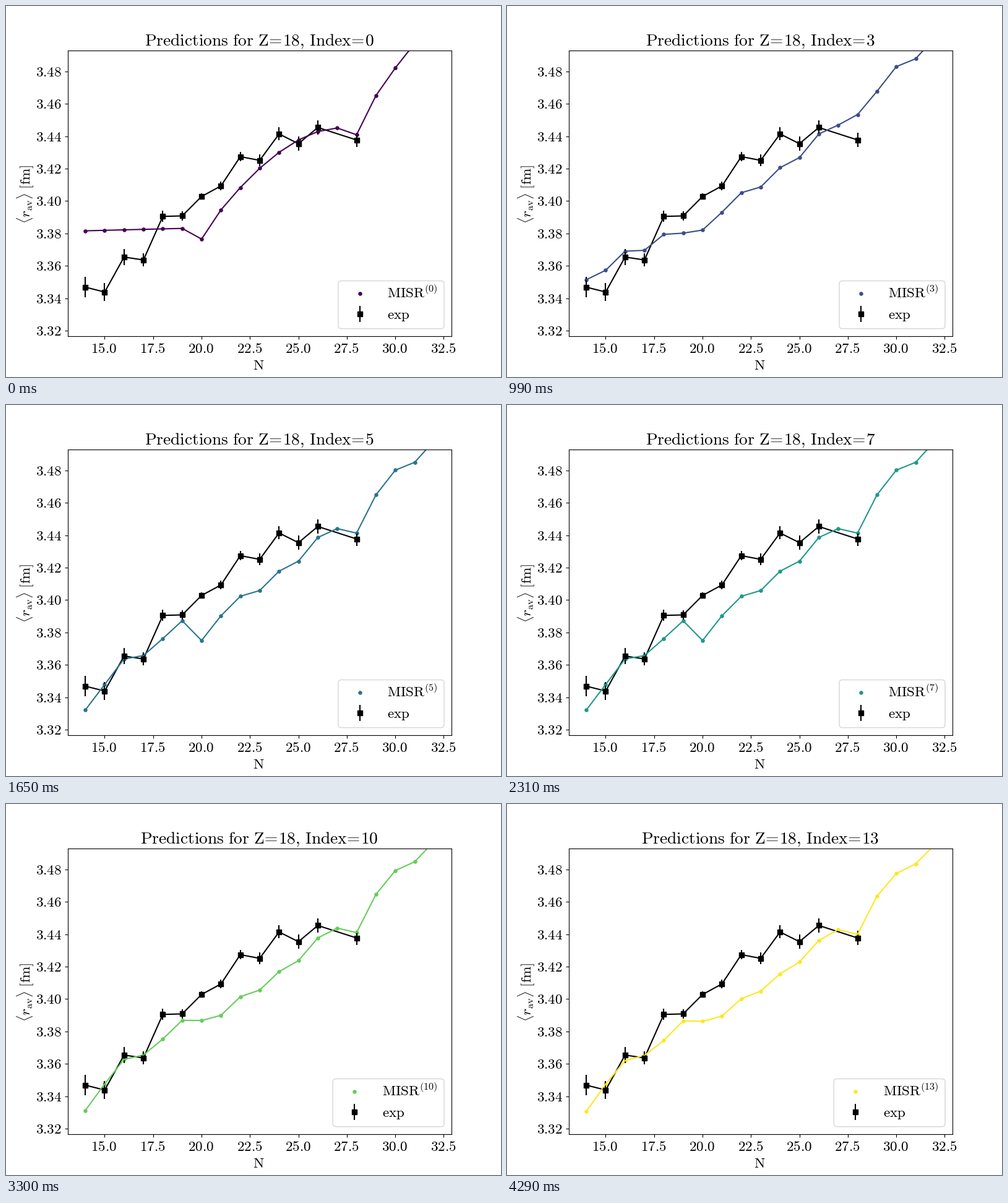
Animation of 800x600 px, one loop 4620 ms. Source, as a matplotlib script:

```python
import matplotlib.pyplot as plt
import numpy as np
from matplotlib.animation import FuncAnimation
from matplotlib.patches import FancyBboxPatch

plt.rcParams["mathtext.fontset"] = "cm"

STEPS = 14
TEXT, TITLE = 16.6, 19.75
X_MIN, X_MAX = 13.1, 32.9
Y_MIN, Y_MAX = 3.31653, 3.49293

# Offsets are in units of 1e-4 fm above 3.3 fm.
EXP_N = np.append(np.arange(14, 27), 28)
EXP = [468, 438, 654, 636, 905, 908, 1028, 1093, 1274, 1251, 1414, 1354, 1454, 1377]
EXP_ERR = 20 + np.maximum(7 * (20 - EXP_N), np.minimum(5 * (EXP_N - 20), 24))

N = np.arange(14, 33)
ODD = N % 2 == 1
MAGIC = np.isin(N, (20, 28))
EVEN_KNOTS = [338, 653, 779, 809, 1040, 1195, 1403, 1523, 1819, 2000]


def radius(offset):
    return 3.3 + np.asarray(offset) * 1e-4


def ramp(index, start, end):
    return np.clip((index - start) / (end - start), 0, 1)


# Odd isotopes sag below their even neighbours, most of all beside multiples of 8.
sag = np.where(np.isin(N % 8, (1, 7)), 42, 5) * (ODD & (N > 16))
smooth = np.interp(N, N[::2], EVEN_KNOTS) - sag

# First guess: a plateau, a dip at 20, an arc up to 27, then a rise from 28.
first = np.select(
    [N < 20, N == 20, N < 28],
    [816 + 3 * (N - 14), 765, 1451 - 22 * np.abs(27 - N) ** 1.75],
    1409 + 242 * np.abs(N - 28) ** 0.77)

light_excess = 22 + 330 * np.exp(-0.92 * (N - 14))
shell = -17 + 100 * (N == 19) - 42 * (N == 20) - 93 * (N == 28)
filled_dip = 120 * (N == 20)
pairing = -6 - 12 * (~ODD & ~MAGIC)
tilt = 3 - 0.75 * (N - 14)


def prediction(index):
    """Each correction joins the model over its own span of steps."""
    refined = (smooth
               + light_excess * (1 - ramp(index, 2, 4))
               + shell * ramp(index, 4, 5)
               + filled_dip * ramp(index, 7, 8)
               + pairing * ramp(index, 9, 11)
               + tilt * ramp(index, 11, 13))
    blend = ramp(index, 0, 2)
    return radius(first * (1 - blend) + refined * blend)


fig = plt.figure(figsize=(8, 6), dpi=100, facecolor="white")
ax = fig.add_axes([0.125, 0.11, 0.775, 0.77])
ax.set(xlim=(X_MIN, X_MAX), ylim=(Y_MIN, Y_MAX))
x_ticks = np.arange(15, 33, 2.5)
y_ticks = np.arange(3.32, 3.49, 0.02)
ax.set_xticks(x_ticks, labels=[])
ax.set_yticks(y_ticks, labels=[])

# Overlay in stage pixels, y pointing down, for all text and the legend.
stage = fig.add_axes([0, 0, 1, 1])
stage.set(xlim=(0, 800), ylim=(600, 0))
stage.axis("off")


def roman(text):
    return rf"$\mathrm{{{text}}}$"


def label(x, y, text, size=TEXT, ha="center", **kw):
    return stage.text(x, y, text, fontsize=size, ha=ha, va="baseline", **kw)


for tick in x_ticks:
    x = 100 + 620 * (tick - X_MIN) / (X_MAX - X_MIN)
    label(x - 1, 561, roman(f"{tick:.1f}"))
for tick in y_ticks:
    y = 534 - 462 * (tick - Y_MIN) / (Y_MAX - Y_MIN)
    label(90.3, y + 8, roman(f"{tick:.2f}"), ha="right")
label(408.5, 588, roman("N"))
label(39.5, 304, r"$\langle r_{\mathrm{av}}\rangle\ \mathrm{[fm]}$",
      rotation=90, rotation_mode="anchor")
title = label(409.5, 63.5, "", TITLE)

# Measured values
ax.plot(EXP_N, radius(EXP), color="black", lw=1.5)
ax.errorbar(EXP_N, radius(EXP), yerr=EXP_ERR * 1e-4, fmt="s",
            color="black", ms=6, elinewidth=1.5)

# Predicted values
dots = ax.scatter(N, prediction(0), s=10, lw=1.5, zorder=1)
line, = ax.plot(N, prediction(0), lw=1.5)

# Legend
box = FancyBboxPatch((537, 444.5), 171, 77.3, boxstyle="round,pad=0,rounding_size=5",
                     fc="white", ec="0.8", lw=1, alpha=0.8)
stage.add_patch(box)
key_dot = stage.scatter([572], [465], s=10, lw=1.5)
key_bar, = stage.plot([572, 572], [485, 511], color="black", lw=1.5,
                      solid_capstyle="butt")
key_square, = stage.plot([572], [498], "s", color="black", ms=6)
key_name = label(616.5, 472, "", ha="left")
key_exp = label(616.5, 506.5, roman("exp"), ha="left")


def draw(index):
    color = plt.cm.viridis(index / (STEPS - 1))
    values = prediction(index)
    line.set_data(N, values)
    line.set_color(color)
    dots.set_offsets(np.column_stack([N, values]))
    dots.set_color(color)

    title.set_text(roman(rf"Predictions\ for\ Z\!=\!18{{,}}\ Index\!=\!{index}"))

    # A second digit widens the legend to the left.
    shift = 8.8 if index > 9 else 0
    box.set_x(537 - shift)
    box.set_width(171 + shift)
    key_x = 572 - shift
    key_dot.set_offsets([[key_x, 465]])
    key_dot.set_color(color)
    key_bar.set_xdata([key_x, key_x])
    key_square.set_xdata([key_x])
    key_name.set_x(616.5 - shift)
    key_name.set_text(rf"$\mathrm{{MISR}}^{{\mathrm{{({index})}}}}$")
    key_exp.set_x(616.5 - shift)
    return line, dots, title, box, key_dot, key_bar, key_square, key_name, key_exp


animation = FuncAnimation(fig, draw, frames=STEPS, interval=330, repeat=True, repeat_delay=0)
plt.show()
```
